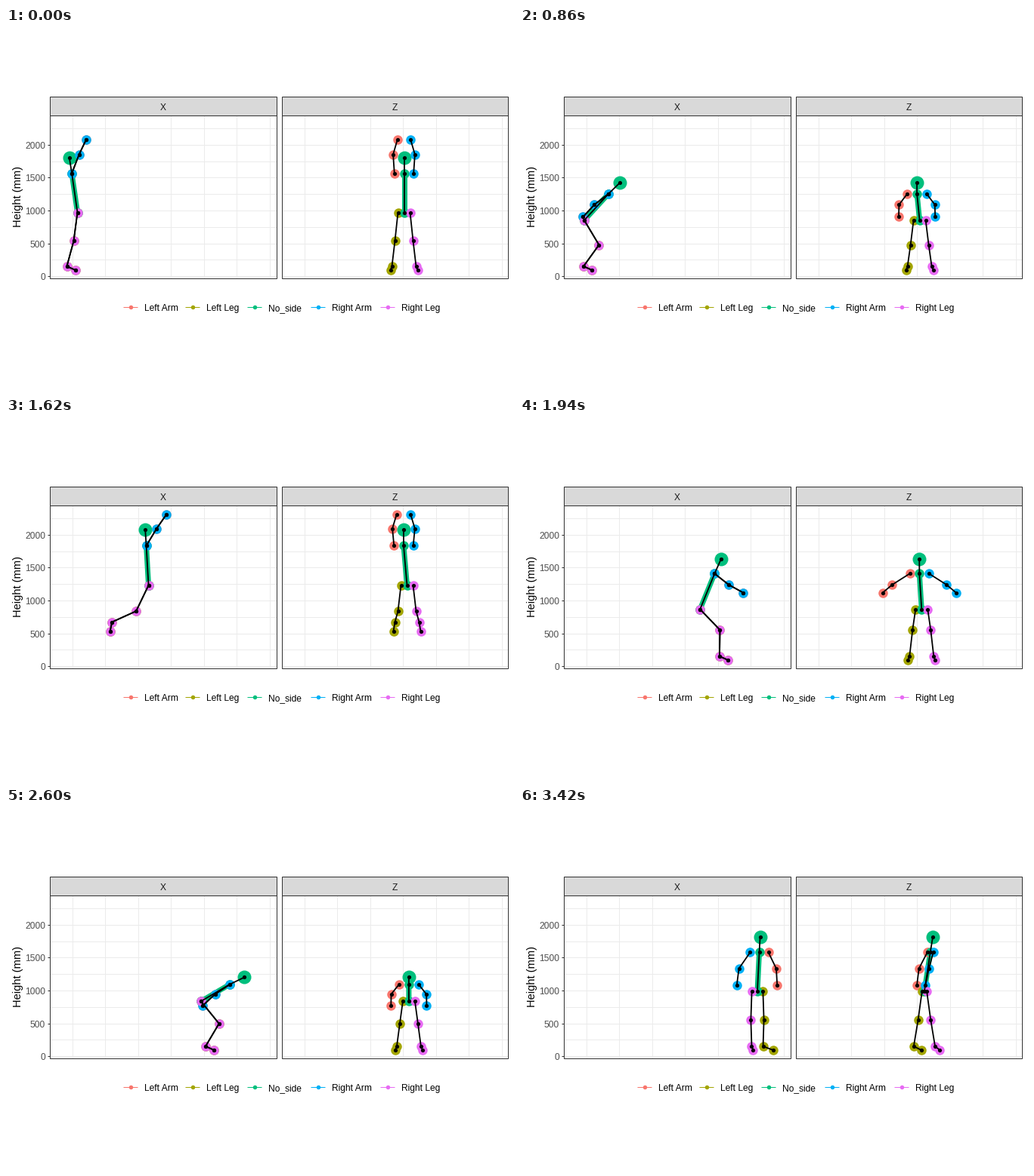
Write a matplotlib script that moves like this. It is 672x480 px and loops after 3440 ms.

```python
import numpy as np
import matplotlib.pyplot as plt
from matplotlib.animation import FuncAnimation
from matplotlib.patches import Rectangle

W, H, DPI = 672, 480, 96
FRAMES, STEP = 172, 20
PX = 72 / DPI  # points per pixel

COLORS = {
    "Left Arm": "#F8766D",
    "Left Leg": "#A3A500",
    "No_side": "#00BF7D",
    "Right Arm": "#00B0F6",
    "Right Leg": "#E76BF3",
}

plt.rcParams["font.family"] = "Liberation Sans"
fig = plt.figure(figsize=(W / DPI, H / DPI), dpi=DPI, facecolor="white")
ax = fig.add_axes([0, 0, 1, 1])
ax.set_xlim(0, W)
ax.set_ylim(H, 0)
ax.axis("off")


# ---- static chart ----
def line(xs, ys, color, width=1, z=1):
    return ax.plot(xs, ys, color=color, lw=width * PX, zorder=z,
                   solid_capstyle="butt")[0]


def dots(color, size, z, xs=(), ys=()):
    return ax.plot(xs, ys, "o", color=color, ms=size * PX, mew=0, zorder=z)[0]


def label(x, y, s, size=12, color="black", **kw):
    ax.text(x, y, s, fontsize=size * PX, color=color, zorder=3, **kw)


def box(x0, y0, x1, y1, fill, z):
    ax.add_patch(Rectangle((x0, y0), x1 - x0, y1 - y0, facecolor=fill,
                           edgecolor="#333333", lw=PX, zorder=z))


for left, right, title in ((58, 358, "X"), (365, 664, "Z")):
    for k in range(10):
        y = round(329 - 21.75 * k)
        line([left, right], [y, y], "#EBEBEB")
    for k in range(7):
        x = left + round(29.6 + 43.5 * k)
        line([x, x], [116, 332], "#EBEBEB")
    box(left, 116, right, 332, "none", 20)
    box(left, 91, right, 116, "#D9D9D9", 2)
    label((left + right) / 2, 109, title, color="#1A1A1A", ha="center")

for k in range(5):
    y = round(329 - 43.5 * k)
    line([55, 58], [y, y], "#333333")
    label(52, y + 5, str(500 * k), color="#4D4D4D", ha="right")
label(16.5, 223, "Height (mm)", 14.67, rotation=90, ha="center", va="center")

for x, (name, color) in zip((165, 247, 329, 413, 505), COLORS.items()):
    line([x - 10, x + 9], [370, 370], color)
    dots(color, 5.5, 2, [x], [370])
    label(x + 18, 375, name)


# ---- motion: a jointed body driven by a few angles ----
def curve(*points):
    """Smooth monotone curve through (time, value) points."""
    t, v = np.array(points, float).T
    slope = np.diff(v) / np.diff(t)
    a, b = slope[:-1], slope[1:]
    same = a * b > 0
    m = np.zeros_like(v)
    m[1:-1] = np.where(same, 2 * a * b / np.where(same, a + b, 1), 0)

    def value(now):
        now = min(max(now, t[0]), t[-1])
        i = min(np.searchsorted(t, now, side="right") - 1, len(t) - 2)
        h = t[i + 1] - t[i]
        u = (now - t[i]) / h
        ease = u * u * (3 - 2 * u)
        bend = u * (1 - u) * h * ((1 - u) * m[i] - u * m[i + 1])
        return v[i] + ease * (v[i + 1] - v[i]) + bend

    return value


def hump(t, start, end):
    """Rises from 0 to 1 and back between two times."""
    return np.sin(np.pi * np.clip((t - start) / (end - start), 0, 1)) ** 2


# Angles in degrees from upright, leaning forward is positive.
ankle_x = curve((0, 80.5), (1200, 86.5), (1460, 90), (1920, 264),
                (2620, 264), (2880, 319.5), (3420, 314))
foot = curve((1300, 114), (1620, 192), (1880, 114))
shin = curve((0, 15), (560, 18.4), (1200, 54.5), (1400, 42), (1620, 65.6),
             (1900, 0), (2340, 34.6), (2620, 30), (2880, 0))
thigh = curve((0, 7.5), (560, -16.6), (940, -32), (1200, -27), (1620, 25.6),
              (1840, -44), (2340, -40.7), (2880, -36), (3420, 0))
trunk = curve((0, -8.2), (560, 19), (940, 45), (1200, 46), (1620, -3.3),
              (1900, 18), (2340, 67), (2880, 44), (3420, 9))
arm = curve((0, 21), (180, 14), (560, 69), (940, 250), (1200, 204),
            (1620, 31), (1900, 115), (2340, 253), (2880, 213), (3420, 202))
turn = curve((2880, 0), (3420, 1))

# Final turn of each body level: the feet lag behind the shoulders.
TOE, ANKLE, KNEE, HIP, SHOULDER, ELBOW, HAND = range(7)
TURN = np.radians([47, 28, 46, 67, 72, 75, 78])


def bone(start, length, angle, yaw):
    angle = np.radians(angle)
    ahead = length * np.sin(angle)
    return start + np.array([ahead * np.cos(yaw), -length * np.cos(angle),
                             ahead * np.sin(yaw)])


def pose_at(t):
    """Joints as (forward, height, sideways): left 7, right 7, head, neck, pelvis."""
    yaw = TURN * turn(t)
    lean, swing = trunk(t), arm(t)
    down = np.cos(np.radians(swing))
    lift = 45.6 * hump(t, 1340, 1920) + 4 * hump(t, 2620, 2880)
    flare = 38 * np.exp(-((t - 2000) / 90) ** 2)

    ankle = np.array([ankle_x(t), 316 - lift, 526.5 + 8.5 * t / 3440])
    toe = bone(ankle, 12.3, foot(t), yaw[TOE])
    knee = bone(ankle, 35, shin(t), yaw[KNEE])
    hip = bone(knee, 38, thigh(t), yaw[HIP])
    spine = 52.5 - 10.5 * np.sin(np.radians(lean)) ** 2
    neck = bone(hip, spine, lean, yaw[SHOULDER])
    neck[2] -= 5 * hump(t, 0, 2700)
    head = bone(neck, 21, 1.08 * lean, yaw[SHOULDER])
    elbow = bone(neck, 25 + 2 * down, swing, yaw[ELBOW])
    hand = bone(elbow, 22, swing - 4 + 9 * down, yaw[HAND])

    mid = np.array([toe, ankle, knee, hip, neck, elbow, hand])
    spread = np.array([18, 16, 12, 8, 12.7,
                       20 - 6 * down + flare / 2, 18 - 10 * down + flare])
    side = np.column_stack([np.sin(yaw), 0 * yaw, -np.cos(yaw)]) * spread[:, None]
    return np.vstack([mid + side, mid - side, head, neck, hip])


# ---- moving figure ----
HEAD, NECK, PELVIS = 14, 15, 16
ARM, LEG = np.array([SHOULDER, ELBOW, HAND]), np.array([HIP, KNEE, ANKLE, TOE])
CHAINS = {
    "Left Arm": ARM,
    "Left Leg": LEG,
    "No_side": [HEAD, NECK, PELVIS],
    "Right Arm": ARM + 7,
    "Right Leg": LEG + 7,
}

parts = []  # (artist, joints, horizontal axis, offset)
for axis in (0, 2):
    parts.append((line([], [], COLORS["No_side"], 7, 4), [NECK, PELVIS], axis))
    for z, (name, chain) in enumerate(CHAINS.items(), 5):
        parts.append((dots(COLORS[name], 12.5, z), chain, axis))
        parts.append((line([], [], "black", 1.8, 11), chain, axis))
        parts.append((dots("black", 5.2, 12), chain, axis))
    parts.append((dots(COLORS["No_side"], 18, 7), [HEAD], axis))


def draw(i):
    joints = pose_at(i * STEP)
    for artist, chain, axis in parts:
        artist.set_data(joints[chain, axis], joints[chain, 1])
    return [p[0] for p in parts]


anim = FuncAnimation(fig, draw, frames=FRAMES, interval=STEP, repeat=True,
                     repeat_delay=0, blit=False)
plt.show()
```
